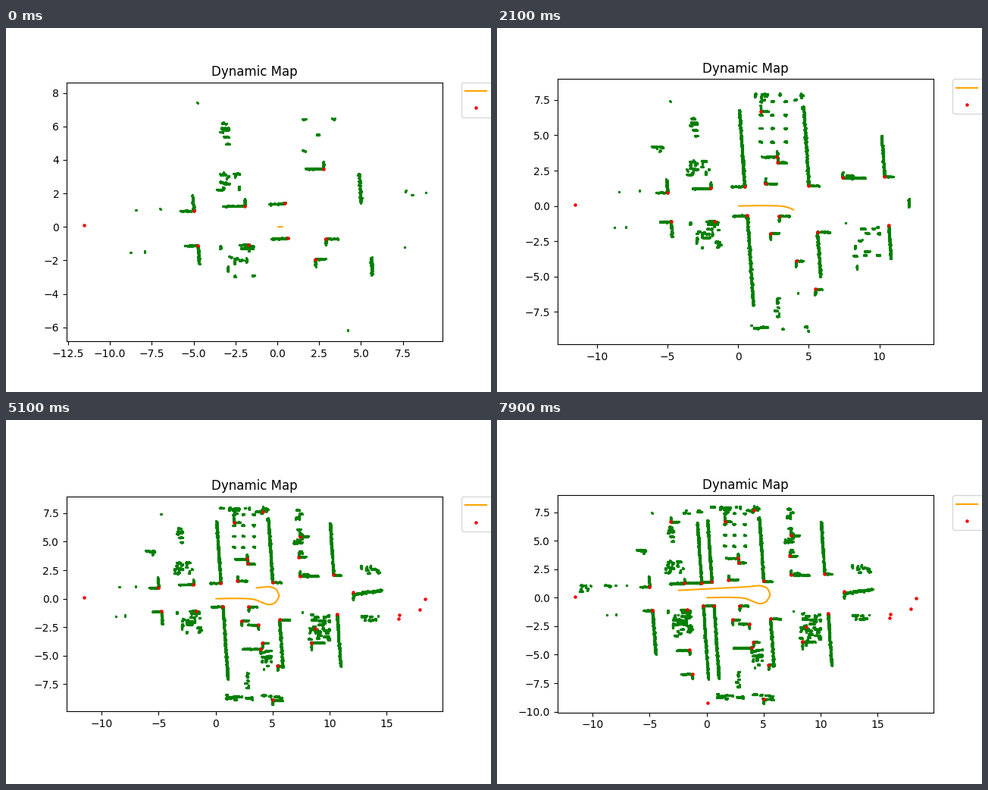
Write a matplotlib script that moves like this. It is 640 px wide and 480 px high and loops after 8000 ms.

```python
import numpy as np
import matplotlib.pyplot as plt
from matplotlib.animation import FuncAnimation

FRAMES = 80
LEAN = 0.07      # the building is drawn slightly skewed
rng = np.random.default_rng(11)

echoes = []      # blocks of x, y, birth
landmarks = []   # rows of x, y, birth


def seg(x0, y0, x1, y1, t0, t1=None, noise=0.022):
    """Echoes along a line that grows from t0 to t1."""
    n = int(np.hypot(x1 - x0, y1 - y0) / 0.02) + 2
    u = np.linspace(0, 1, n)
    t = t0 + ((t1 or t0) - t0) * u
    echoes.append(np.column_stack([
        x0 + (x1 - x0) * u + rng.normal(0, noise, n),
        y0 + (y1 - y0) * u + rng.normal(0, noise, n), t]))


def wall(x, foot, tip, ledge, t0, t1):
    """Leaning wall with a ledge and a landmark at its foot."""
    seg(x, foot, x + LEAN * (foot - tip), tip, t0, t1, 0.035)
    seen = abs(t0)
    if ledge:
        seg(x, foot, x + ledge, foot - 0.03, seen)
    landmarks.append((x, foot, seen))


def desk(x, y, width, t):
    """Corner with a leg pointing away from the corridor."""
    seg(x, y, x + width, y, t)
    seg(x, y, x, y + 0.4 * np.sign(y), t)
    landmarks.append((x, y, t))


def room(x0, x1, y0, y1, t0, t1):
    """Fill a box with short upright and level dashes."""
    n = int(4 + 5 * (x1 - x0) * (y1 - y0))
    for t in rng.uniform(t0, t1, n):
        x, y = rng.uniform(x0, x1), rng.uniform(y0, y1)
        if rng.random() < 0.65:
            seg(x, y, min(x + rng.uniform(0.05, 0.5), x1), y, t)
        else:
            seg(x, y, x, min(y + rng.uniform(0.05, 0.35), y1), t)


# Walls: x, foot, tip, ledge, start, end (a start below 0 is partly seen)
for w in [(-5.0, 0.97, 1.85, -0.8, 0, 0), (-4.75, -1.1, -2.2, -0.8, 0, 0),
          (0.45, 1.4, 6.8, -0.9, 0, 8), (0.63, -0.68, -7.05, -1.0, 0, 8),
          (5.0, 1.45, 7.05, 0.75, -4, 9), (5.6, -1.83, -6, 0.9, -10, 30),
          (10.35, 2.1, 6.7, 0.65, 6, 30), (10.65, -1.35, -5.95, 0, 2, 38),
          (-0.3, -0.72, -7.1, 0, 64, 71), (-0.45, 1.3, 6.6, -2.2, 63, 72),
          (-4.75, -1.1, -4.95, 0, 62, 74)]:
    wall(*w)
seg(12.1, 0.4, 14.5, 0.75, 34, 48, 0.05)
seg(12.08, -0.05, 12.08, 0.5, 17)

# Desks by time of first sight: corner and width
desks = {
    -6: [(-1.95, 1.25, -1.3), (-1.7, -1.07, -0.55), (2.75, 3.47, -1.05),
         (2.9, -0.7, 0.75), (2.27, -1.93, 0.6)],
    7: [(1.6, 6.7, 0.55), (1.92, 1.57, 0.8), (2.8, 3.07, 0.6)],
    16: [(7.4, 2, 1.5), (4.1, -3.88, 0.5), (5.45, -5.88, 0.45)],
    26: [(3.75, -2.3, -0.9), (3.95, -4.4, -1.6), (7.4, 5.45, 0.75),
         (7.3, 3.65, 0.6), (8.75, -2.6, -0.5)],
    40: [(4.15, 7.65, -0.6), (5, -8.9, 0.85), (8.4, -3.85, 0.8)],
    66: [(-1.5, -4.6, -1.1), (-1.25, -6.7, -0.95), (-3.15, 6.65, 0.7)]}
for t, group in desks.items():
    for k, d in enumerate(group):
        desk(*d, t + k)

# Chair rows of the middle room
for y in np.arange(4.55, 7.5, 0.95):
    for x in (1.6, 2.4, 3.35):
        seg(x - 0.08, y, x + 0.08, y, rng.uniform(-6, 20))

# Loose furniture: x range, y range, time range
for r in [(-3.7, -1.7, 1.95, 3.25, -16, 6), (-3.9, -1.1, -1.3, -1.1, -4, 4),
          (-3.0, -1.2, -3.0, -1.6, -8, 8), (-3.6, -2.9, 4.9, 6.3, -8, 2),
          (-6.3, -5.3, 3.8, 4.2, 2, 9), (-0.3, 4.6, 7.5, 8.0, 1, 30),
          (0.6, 5.8, -8.85, -8.4, 4, 36), (2.5, 2.9, -7.8, -6.2, 3, 11),
          (4.0, 4.9, -6.0, -4.2, 20, 46), (6.9, 7.6, 3.7, 8.1, 22, 46),
          (7.3, 9.0, 1.9, 2.15, -4, 25), (8.1, 10, -4.6, -1.3, 5, 56),
          (12.6, 14.4, 2.2, 2.9, 30, 48), (12.6, 14.4, -1.9, -1.5, 30, 48),
          (-2.4, -0.4, 7.4, 7.7, 64, 74), (-3.1, -1.4, -3.4, -1.5, 64, 78),
          (-9.4, -7.9, 1.0, 1.1, 72, 78), (-11.2, -10.2, 0.5, 1.1, 70, 78)]:
    room(*r)

# Lone far echoes and landmarks
for x, y in [(-4.78, 7.4), (-8.43, 1.03), (-7, 1.07), (-8.75, -1.55),
             (-7.92, -1.5), (8.85, 2.02), (7.57, -1.2), (4.2, -6.13)]:
    seg(x, y, x, y, 0)
landmarks += [(-11.55, 0.1, 0), (18.42, -0.02, 29), (12.05, 0.55, 36),
              (17.9, -0.95, 38), (16.1, -1.45, 42), (16.05, -1.75, 44),
              (0.1, -9.2, 66)]

echoes = np.vstack(echoes)
landmarks = np.array(landmarks)

# Driven path: out along the corridor, a loop, and back
knots = np.array([
    (0, 0), (1.5, 0.03), (2.9, 0.01), (3.5, -0.08), (4.3, -0.44),
    (4.75, -0.55), (5.25, -0.38), (5.62, 0.25), (5.33, 0.87), (4.7, 1.07),
    (3.6, 0.95), (-2.5, 0.64)])


def arc(p):
    return np.r_[0, np.cumsum(np.hypot(*np.diff(p, axis=0).T))]


k = arc(knots)
fine = np.arange(0, k[-1], 0.02)
path = np.column_stack([
    np.convolve(np.pad(np.interp(fine, k, c), 11, mode="edge"),
                np.ones(23) / 23, "valid") for c in knots.T])
s = arc(path)
drive_t = [0, 11, 21, 32, 51, 62, 79]      # slower through the turn
drive_s = [0.26, 2.7, 3.9, 5.13, 8.4, 10.76, s[-1]]

# The view widens in steps: start, x max, y min, y max
X_MIN = -11.57
views = [(0, 8.85, -6.13, 7.93), (4, 9.3, -8.6, 8.0), (8, 11.0, -8.85, 8.08),
         (17, 12.1, -8.9, 8.1), (20, 12.62, -8.95, 8.12),
         (29, 18.42, -9.02, 8.12), (66, 18.42, -9.2, 8.12)]

fig, ax = plt.subplots(figsize=(6.4, 4.8), dpi=100)
ax.set_aspect("equal", adjustable="box")
ax.set_title("Dynamic Map")
cloud, = ax.plot([], [], "o", color="green", ms=1.3, mew=1, zorder=1)
line, = ax.plot([], [], color="orange", zorder=2, label="Trajectory")
dots = ax.scatter([], [], s=5, color="red", zorder=3, label="Landmarks")
ax.legend(bbox_to_anchor=(1.05, 1), loc="upper left", borderaxespad=0)


def padded(lo, hi):
    m = 0.05 * (hi - lo)
    return lo - m, hi + m


def update(i):
    cloud.set_data(*echoes[echoes[:, 2] <= i, :2].T)
    dots.set_offsets(landmarks[landmarks[:, 2] <= i, :2])
    line.set_data(*path[s <= np.interp(i, drive_t, drive_s) + 1e-9].T)
    _, x1, y0, y1 = [v for v in views if v[0] <= i][-1]
    ax.set_xlim(padded(X_MIN, x1))
    ax.set_ylim(padded(y0, y1))
    return cloud, line, dots


anim = FuncAnimation(fig, update, frames=FRAMES, interval=100, repeat=True,
                     repeat_delay=0, blit=False)
plt.show()
```
